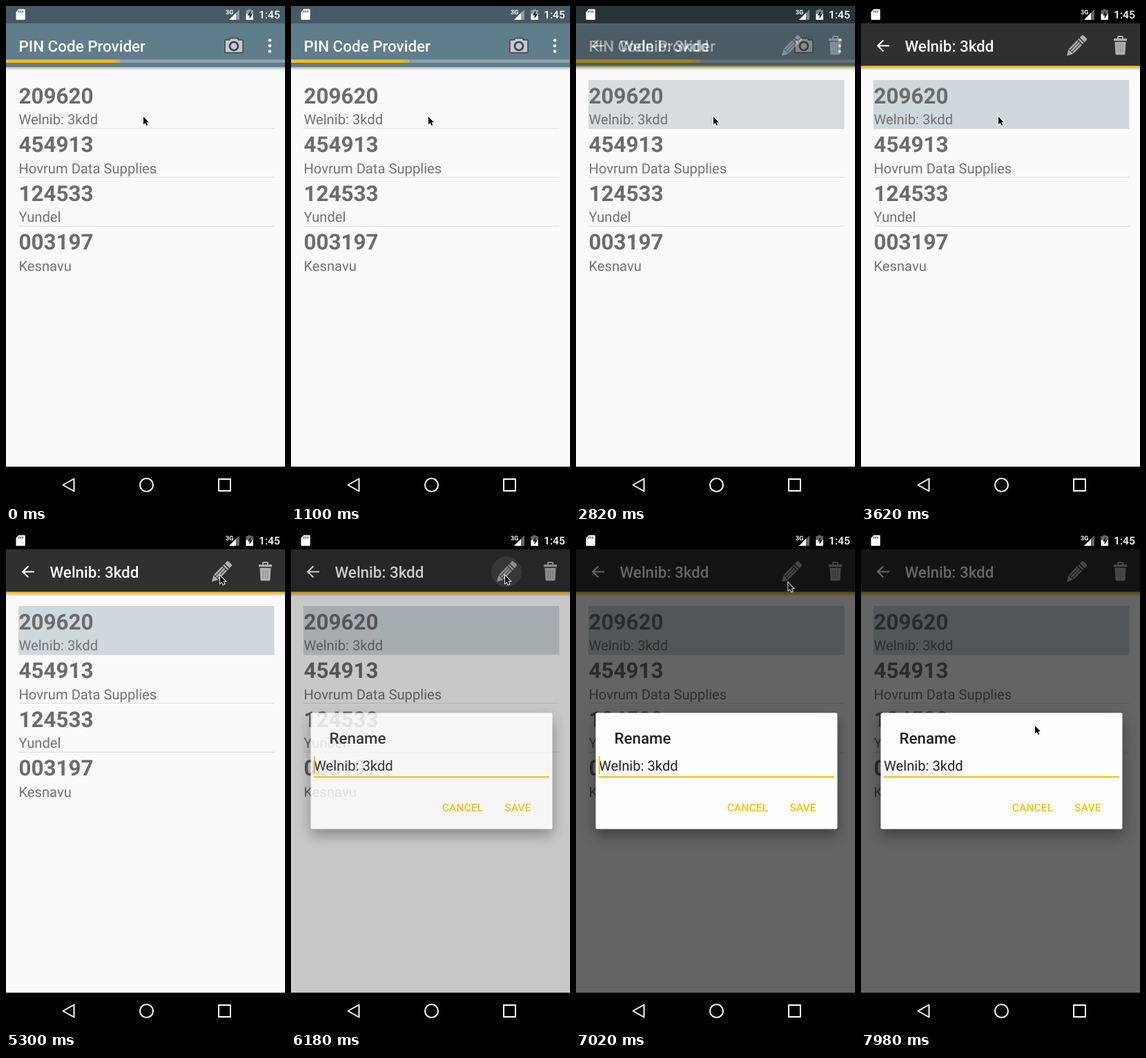
Write an HTML page that moves like this. It is 404 by 720 pixels and loops after 8000 ms.

```html
<!DOCTYPE html>
<html lang="en">
<head>
<meta charset="utf-8">
<title>One-time codes</title>
<style>
html, body { margin: 0; width: 100%; height: 100%; overflow: hidden; background: #000; }
svg { display: block; width: 404px; height: 720px; font-family: Roboto, sans-serif; text-rendering: geometricPrecision; }

.status, .progress, .pressed, .mode, .ripple, .dim, .dialog, .caret, .cursor {
  animation: 8s linear infinite;
}
.title { font-size: 22.4px; font-weight: 500; }
.code { font-size: 31.4px; font-weight: 700; fill: #6c6c6c; }
.label { font-size: 20.2px; fill: #727272; }
.button { font-size: 15.7px; font-weight: 500; }
.accent { fill: #ffc107; }
.card { filter: drop-shadow(0 9px 10px rgba(0, 0, 0, .38)); }

.status { animation-name: status; }
@keyframes status {
  0%, 32.5% { fill: #455a64; }
  39%, 100% { fill: #000; }
}
.progress { transform-origin: 0 0; animation-name: progress; }
@keyframes progress {
  from { transform: scaleX(165); }
  to { transform: scaleX(206.5); }
}
.pressed { animation-name: pressed; }
@keyframes pressed {
  0%, 19% { fill: #dfdfdf; opacity: 0; }
  23.5%, 32.5% { fill: #dfdfdf; opacity: 1; }
  39%, 100% { fill: #cfd8dc; opacity: 1; }
}
.mode { animation-name: mode; }
@keyframes mode {
  0%, 32.5% { opacity: 0; }
  39%, 100% { opacity: 1; }
}
.ripple { animation-name: ripple; }
@keyframes ripple {
  0%, 70% { opacity: 0; }
  73%, 78% { opacity: .1; }
  88%, 100% { opacity: 0; }
}
.dim { animation-name: dim; }
@keyframes dim {
  0%, 72% { opacity: 0; }
  87.75%, 100% { opacity: .6; }
}
.dialog { transform-origin: 203.5px 345.5px; animation-name: fade, grow; }
@keyframes fade {
  0%, 73.25% { opacity: 0; }
  78%, 100% { opacity: 1; }
}
@keyframes grow {
  0%, 73.25% { transform: scale(.9); animation-timing-function: cubic-bezier(.05, .8, .2, 1); }
  77.25%, 100% { transform: none; }
}
.caret { animation-name: caret; animation-timing-function: step-end; }
@keyframes caret {
  0% { opacity: 1; }
  92%, 100% { opacity: 0; }
}
.cursor { animation-name: cursor; animation-timing-function: ease-in-out; }
@keyframes cursor {
  0%, 52.5% { transform: translate(199px, 160px); }
  63%, 86% { transform: translate(310px, 63px); }
  97.5%, 100% { transform: translate(252px, 280px); }
}
</style>
</head>
<body>
<svg viewBox="0 0 404 720">
  <defs>
    <linearGradient id="shade" x2="0" y2="1">
      <stop stop-opacity=".24"/>
      <stop offset="1" stop-opacity="0"/>
    </linearGradient>
  </defs>

  <rect width="404" height="720" fill="#fafafa"/>

  <!-- code list -->
  <rect class="pressed" x="18" y="107" width="370.5" height="70.5"/>
  <path d="M18 177.3H388.5M18 247.5H388.5M18 318.3H388.5" stroke="#dcdcdc"/>
  <g id="rows"></g>

  <!-- toolbar -->
  <rect y="88.5" width="404" height="5" fill="url(#shade)"/>
  <rect y="25" width="404" height="63.5" fill="#607d8b"/>
  <rect y="77.5" width="404" height="4.5" fill="#8fa1a9"/>
  <rect class="progress accent" y="77.5" width="1" height="4.5"/>
  <text class="title" x="18.5" y="66" fill="#fff">PIN Code Provider</text>
  <g stroke="#37424a" stroke-width="1.5" fill="#c2cbd0">
    <path d="M318 49h5.5l1-2.5h11l1 2.500h5.500q1 0 1 1v16.500q0 1-1 1h-24q-1 0-1-1v-16.500q0-1 1-1z"/>
    <circle cx="330" cy="58" r="6" stroke-width="2.6"/>
  </g>
  <g fill="#fff">
    <circle cx="382" cy="49.5" r="2.3"/>
    <circle cx="382" cy="57.5" r="2.3"/>
    <circle cx="382" cy="65.5" r="2.3"/>
  </g>

  <!-- selection toolbar -->
  <g class="mode">
    <rect y="25" width="404" height="62" fill="#303030"/>
    <rect class="accent" y="86.5" width="404" height="2.6"/>
    <path d="M41 57.5H24.5M32.3 49.5l-8 8 8 8" fill="none" stroke="#fff" stroke-width="2.2"/>
    <text class="title" x="63.5" y="66" fill="#fff">Welnib: 3kdd</text>
    <circle class="ripple" cx="312" cy="57.5" r="22" fill="#fff"/>
    <g fill="#b0b0b0">
      <g transform="translate(298 72) rotate(-46)">
        <path d="M0 0l8.500-4.800v9.600zM9.500-4.800h17v2.500h-17zM9.500-1.300h17v2.600h-17zM9.500 2.300h17v2.500h-17zM28-4.800h2.500v9.600h-2.500zM32-4.800h4q2 0 2 2v5.600q0 2-2 2h-4z"/>
      </g>
      <path d="M366 47h5v-2q0-2 2-2h5q2 0 2 2v2h5v3.500h-19zm7 0h5v-2h-5z" fill-rule="evenodd"/>
      <path d="M367.500 52h16l-1 17q-.1 1.500-1.600 1.500h-10.800q-1.500 0-1.600-1.500z"/>
    </g>
    <path d="M372 55l.4 12M375.5 55v12M379 55l-.4 12" stroke="#8c8c8c"/>
  </g>

  <rect class="dim" y="25" width="404" height="641"/>

  <!-- rename dialog -->
  <g class="dialog">
    <rect class="card" x="28.5" y="261.5" width="350" height="168" rx="2" fill="#fefefe"/>
    <text class="title" x="55.5" y="306" fill="#212121">Rename</text>
    <text x="33" y="345.3" font-size="20.2" fill="#212121">Welnib: 3kdd</text>
    <g class="accent">
      <rect x="33" y="353" width="341" height="2.3"/>
      <rect class="caret" x="32.8" y="324" width="2" height="26"/>
      <text class="button" x="218.8" y="403.7">CANCEL</text>
      <text class="button" x="309.3" y="403.7">SAVE</text>
    </g>
  </g>

  <!-- status bar -->
  <rect class="status" width="404" height="25"/>
  <g fill="#fff">
    <path d="M18.500 4.500h8q1.300 0 1.300 1.300v12.900q0 1.300-1.300 1.300h-10.700q-1.300 0-1.300-1.300v-10z"/>
    <path d="M18.800 6.500v3M21.500 6.500v3M24.200 6.500v3" stroke="#3c4a50" stroke-width="1.3"/>
    <text x="318" y="12" font-size="9" font-weight="700">3G</text>
    <path d="M338 5v15h-15z" opacity=".4"/>
    <path d="M333 10v10h-10z"/>
    <path d="M350.500 4.500h4v1.500h3.500v14h-10.500v-14h3z" opacity=".4"/>
    <path d="M347.500 11.500h10.500v8.500h-10.500z"/>
    <path d="M354.200 7l-4.400 6.600h2.800v4.600l4.400-6.800h-2.800z" fill="#1c2428"/>
    <text x="366" y="18.3" font-size="15.7" font-weight="500">1:45</text>
  </g>

  <!-- navigation bar -->
  <rect y="666" width="404" height="54"/>
  <g fill="none" stroke="#fff" stroke-width="2">
    <path d="M82.500 692.500l16-9v18z" stroke-linejoin="round"/>
    <circle cx="203.5" cy="692.5" r="9.5"/>
    <rect x="308" y="684" width="17" height="17"/>
  </g>

  <path class="cursor" d="M0 0V11.300L2.600 8.900 4.500 13 6.300 12.200 4.500 8.200H7.800Z" stroke="#fff" stroke-width="1.8" paint-order="stroke"/>
</svg>
<script>
const entries = [
  ["209620", "Welnib: 3kdd"],
  ["454913", "Hovrum Data Supplies"],
  ["124533", "Yundel"],
  ["003197", "Kesnavu"],
];
const rowHeight = 70.6;
document.getElementById("rows").innerHTML = entries.map(([code, label], i) => `
  <g transform="translate(18.4 ${107 + i * rowHeight})">
    <text class="code" y="33.5">${code}</text>
    <text class="label" y="64">${label}</text>
  </g>`).join("");
</script>
</body>
</html>
```
